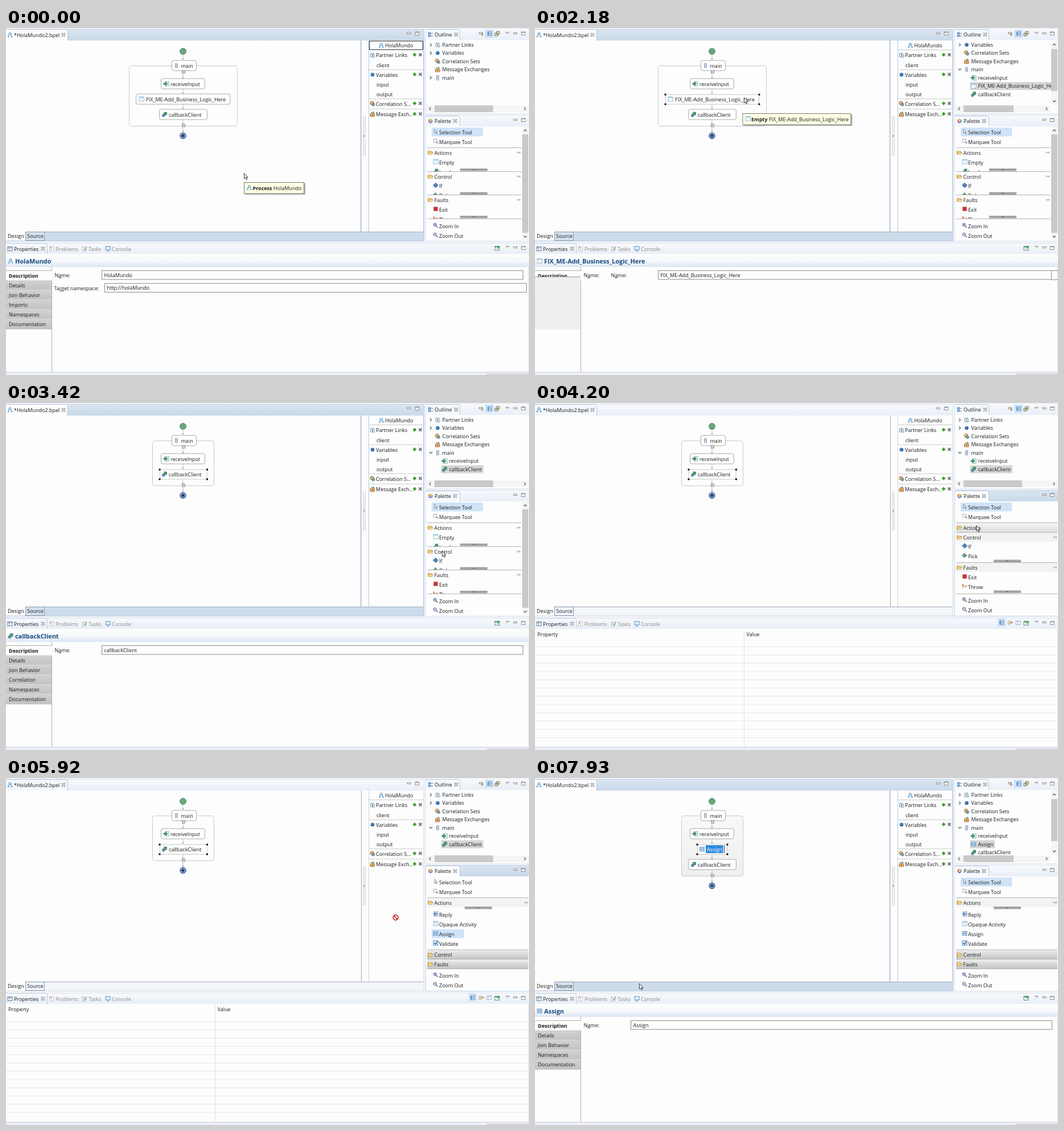
Animation, 919 px wide and 610 px high, one loop 8 s. Source, as an HTML page:

```html
<!DOCTYPE html>
<html lang="en">
<head>
<meta charset="utf-8">
<title>Process editor</title>
<style>
html, body { margin: 0; width: 100%; height: 100%; overflow: hidden; background: #fdfdfd; }
svg { display: block; }
text { white-space: pre; }
</style>
</head>
<body>
<svg id="stage" width="100%" height="100%" viewBox="0 0 919 610" font-family="'Open Sans', 'Noto Sans', sans-serif" font-size="9" fill="#1a1a1a">
<defs>
<linearGradient id="bar" x2="0" y2="1"><stop stop-color="#f7f9fc"/><stop offset="1" stop-color="#e9eef7"/></linearGradient>
<linearGradient id="hot" x2="0" y2="1"><stop stop-color="#d9e4f0"/><stop offset="1" stop-color="#c9d9ea"/></linearGradient>
<linearGradient id="head" x2="0" y2="1"><stop stop-color="#fdfdfd"/><stop offset=".55" stop-color="#f3f6fb"/><stop offset="1" stop-color="#dbe5f2"/></linearGradient>
<linearGradient id="tab" x2="0" y2="1"><stop stop-color="#d2d2d2"/><stop offset="1" stop-color="#c2c2c2"/></linearGradient>
<linearGradient id="drawer" x2="0" y2="1"><stop stop-color="#ededed"/><stop offset="1" stop-color="#c4c4c4"/></linearGradient>
<linearGradient id="hover" x2="0" y2="1"><stop stop-color="#f4f4f4"/><stop offset="1" stop-color="#dedede"/></linearGradient>
<linearGradient id="target" x2="0" y2="1"><stop stop-color="#f8f8f8"/><stop offset="1" stop-color="#efefef"/></linearGradient>
</defs>
<g id="view"></g>
<g id="cursor"></g>
</svg>
<script>
const LOOP = 8000, WHITE = '#fdfdfd';
const view = document.getElementById('view'), cursor = document.getElementById('cursor');

const R = (x, y, w, h, fill, more = '') => `<rect x="${x}" y="${y}" width="${w}" height="${h}" fill="${fill}" ${more}/>`;
const P = (d, stroke, fill = 'none', w = 1) => `<path d="${d}" stroke="${stroke}" fill="${fill}" stroke-width="${w}"/>`;
const T = (x, cy, s, more = '') => `<text x="${x}" y="${cy + 3.2}" ${more}>${s}</text>`;
const C = (x, y, r, fill, stroke = 'none') => `<circle cx="${x}" cy="${y}" r="${r}" fill="${fill}" stroke="${stroke}"/>`;
const clip = (x, y, w, h, body) => `<svg x="${x}" y="${y}" width="${w}" height="${h}" viewBox="${x} ${y} ${w} ${h}">${body}</svg>`;
const at = (x, y, body) => `<g transform="translate(${x} ${y})">${body}</g>`;

const sheet = R(-4, -4, 8.5, 8, '#eef7fc', 'stroke="#8fb3ce" stroke-width=".8"') + R(-4, -4, 8.5, 1.8, '#9fcae6');
const icons = {
  process: P('M0-4.5L2.5-2 0 .5-2.5-2ZM-1.5-.5L-4 3.5H-1.5M1.5-.5L4 3.5H1.5', '#3a86c4', '#cfe8f7'),
  links: P('M-3.5-3H-.5V3.5H-3.5ZM.5-1H3.5V4H.5Z', '#6f8ea8', '#e4eef4', .8) + C(1.5, -3, 1, '#7d9a68'),
  variable: C(0, 0, 3.3, '#2d6cae') + C(-1, -1, 1, '#8db9e4'),
  correlation: C(-1, -1, 3, '#e9c46a', '#a6543a') + C(1.5, 1.5, 2.4, '#7fb686', '#4567a0'),
  exchange: P('M-4-1H3.5V4H-4ZM-4 1.5H3.5M0-1V4', '#a8622c', '#f4d58a', .9) + P('M-3-3H2M1-4.5L3-3 1-1.5', '#4a7c4a'),
  sequence: P('M-2-4H2V-1.5H-2ZM-2-1.2H2V1.2H-2ZM-2 1.5H2V4H-2Z', '#7f9bb9', '#e3edf6', .8),
  receive: R(-2, -4, 6.5, 8, '#eef6fb', 'stroke="#6f93b3" stroke-width=".8"') + P('M-4.5-1.2H-.8V-3L2.6 0-.8 3V1.2H-4.5Z', '#2c7548', '#4fa36b', .7),
  reply: R(-3, -4, 7, 8, '#eef6fb', 'stroke="#6f93b3" stroke-width=".8"') + P('M3-1H-.5V-3L-4 0-.5 3V1H3Z', '#2a63a8', '#7fb2e4', .7),
  empty: sheet,
  opaque: sheet + P('M-3-2L3 3', '#b6c3cc'),
  invoke: P('M-4 1L0-3-1-4H4V1L3 0-1 4Z', '#2c6b58', '#4b9d74', .7) + P('M-4.5 2.5L-2 0 .5 2.5-2 4.5Z', '#335f9a', '#6c9ed0', .7),
  assign: P('M-4-3.5H4V-.8H-4ZM-4 .8H4V3.5H-4Z', '#4d84bd', '#d9e9f8', .9),
  validate: R(-4, -4, 8, 8, '#eaf3fb', 'stroke="#4b86bd"') + P('M-2.5 0L-.5 2 3-2.5', '#1f62a8', 'none', 1.6),
  folder: P('M-4 3V-3H-1L0-2H3V-.5M-4 3L-2.2-.5H4.8L3 3Z', '#b98a2f', '#fbe3a0', .8),
  'if': P('M0-4.3L4.5 0 0 4.3-4.5 0Z', '#2c5f93', '#4f86ba', .7),
  pick: P('M-4.5 0L0-4 1-1.5 4.5 0 1 1.5 0 4Z', '#25663f', '#55a675', .7),
  exit: R(-3.2, -3.2, 6.4, 6.4, '#d6293c', 'stroke="#a83a48" stroke-width=".7"'),
  'throw': P('M-3-3.5V1M-3 2.5V3.5', '#c33', 'none', 1.6) + P('M-1 0H3M1.5-2L4 0 1.5 2', '#b08a20'),
  arrow: P('M-2-4V3L-.3 1.5 1 4 2 3.5 .8 1H3Z', '#666', '#fff', .8),
  marquee: P('M-3.5-3.5H2V2H-3.5Z', '#4a6583', 'none', .9).replace('/>', ' stroke-dasharray="1.5 1.2"/>') + P('M1 1L4.5 4', '#333'),
  zoomin: C(-1.2, -1.2, 2.8, '#eef4fb', '#5f7196') + P('M1 1L3.8 3.8M-2.6-1.2H.2M-1.2-2.6V.2', '#3c4c78', 'none', 1.1),
  zoomout: C(-1.2, -1.2, 2.8, '#eef4fb', '#5f7196') + P('M1 1L3.8 3.8M-2.6-1.2H.2', '#3c4c78', 'none', 1.1),
  close: P('M-3-3L3 3M3-3L-3 3', '#8c8c8c', 'none', 2.4) + P('M-2.6-2.6L2.6 2.6M2.6-2.6L-2.6 2.6', '#fff', 'none', .9),
  plus: P('M0-3V3M-3 0H3', '#3f9a2f', 'none', 2.4),
  remove: P('M-2.5-2.5L2.5 2.5M2.5-2.5L-2.5 2.5', '#777', 'none', 1.9),
  min: R(-3, -1.5, 6, 2.4, '#fff', 'stroke="#777" stroke-width=".8"'),
  max: R(-3.3, -3, 6.6, 5.5, '#fff', 'stroke="#777" stroke-width=".8"') + P('M-3.3-2.4H3.3', '#777'),
  menu: P('M-3-1.5H3L0 1.5Z', '#777', '#fff', .8),
  tree: P('M-3-3H0M-3-3V3H0M-3 0H0M1-3H4M1 0H4M1 3H4', '#35699f', 'none', 1.2),
  outline: P('M-3.5-3.5H0V-1H-3.5ZM-3.5 1H0V3.5H-3.5ZM1.5-2H4M1.5 2.5H4', '#3c74b4', '#cfe2f4', 1.1),
  palette: ['#e8b63a', '#8abf4c', '#4f9fd6', '#6d6cc0', '#c95fa6', '#e2703a'].map((c, i) =>
    C(2.6 * Math.sin(i * Math.PI / 3), -2.6 * Math.cos(i * Math.PI / 3), 1.5, c)).join(''),
  sync: P('M-3.5-2.5H2.5V.5H-3.5Z', '#8f8d80', '#e9e7da', .9) + P('M1-1L4 1.5 1 4Z', '#77756a', '#c9c6b2', .7),
  stack: P('M-4-1H1V4H-4ZM-1-4H4V1H-1Z', '#7a7353', '#ddd8bf'),
  table: R(-4, -3.5, 8, 7, '#fff', 'stroke="#5f7fa3"') + P('M-4-1.5H4M-1-3.5V3.5', '#5f7fa3', 'none', .8),
  problems: R(-3.5, -4, 7, 8, '#fff', 'stroke="#b3bdc7" stroke-width=".8"') + C(-1, -1.5, 1.4, '#d88') + C(0, 2, 1.1, '#e6c873'),
  tasks: R(-3.5, -3, 6, 7, '#f2f5e6', 'stroke="#a3aeb0" stroke-width=".8"') + P('M-1 0L1 2 4-3', '#6ba286', 'none', 1.2),
  console: R(-4, -4, 8, 6, '#e4f0fa', 'stroke="#6190bd"') + P('M-2 4H2', '#6190bd', 'none', 1.2),
  pinned: R(-4.5, -3, 8, 6.5, '#fff', 'stroke="#5c8b72"') + P('M-4.5-2.5H3.5M0 1L4-3.5', '#3d9a5f', 'none', 1.8),
  filter: P('M-4-2.5H1M-4 2.5H1M-4 0H4M2-2L4.5 0 2 2', '#b28b3f', 'none', 1.2),
  pin: P('M-1-1.7L-3 0-1 1.7M1-1.7L3 0 1 1.7M-2 0H2', '#999', 'none', .9)
};
const I = (name, x, y) => at(x, y, icons[name]);
const chevron = (x, y, turn, color = '#555') => `<path transform="translate(${x} ${y}) rotate(${turn})" d="M-1.5-2.6L1.2 0-1.5 2.6" fill="none" stroke="${color}" stroke-width="1.1"/>`;

const nodes = {
  receiveInput: ['receive', 272, 78], 'FIX_ME-Add_Business_Logic_Here': ['empty', 228, 166.5],
  callbackClient: ['invoke', 269, 85], Assign: ['assign', 284, 54.5]
};
const [RECV, FIX, CALL, ASSIGN] = Object.keys(nodes);

function diagram({ flow, sel }) {
  const wide = flow.includes(FIX), editing = flow.includes(ASSIGN);
  const bottom = 98 + 27 * (flow.length - 1) + 20.5;
  const arrow = (y, len) => P(`M311 ${y}V${y + len}`, '#c4c4c4') + P(`M309.3 ${y + len - 3}H312.7L311 ${y + len}Z`, 'none', '#aaa');
  const fold = y => R(309.5, y - 2.5, 5, 5, '#fff', 'stroke="#777" stroke-width=".8"') + P(`M310.5 ${y}H313.5`, '#333', 'none', .8);
  const box = (x, y, w) => R(x + .5, y - 9, w - 1, 18, '#fff', 'rx="3" stroke="#a9a9a9"');
  let s = C(311, 41, 5.5, '#6aa57c', '#559a6b');
  s += R(wide ? 216.5 : 257.5, 66.5, wide ? 190 : 108, bottom - 66.5, editing ? 'url(#target)' : 'none', 'rx="4" stroke="#c9c9c9"');
  s += arrow(47, 9) + box(291, 66, 44) + I('sequence', 299.5, 66) + T(307.5, 67, 'main') + fold(77);
  flow.forEach((name, i) => {
    const [icon, x, w] = nodes[name], y = 98 + 27 * i, on = name === sel;
    s += arrow(y - 18, 9);
    s += on ? R(x + 1.5, y - 8, w - 2.5, 17, '#fff', 'stroke="#c6c6c6"') : box(x, y, w);
    s += I(icon, x + (name === FIX ? 10 : 9.5), y);
    if (on && name === ASSIGN)
      s += R(299, y - 8, 34, 16, '#fff') + R(300, y - 7, 30.5, 14, '#2f8ae0') + P(`M332.5 ${y - 7}V${y + 7}`, '#333') + T(302, y + .5, name, 'fill="#fff"');
    else s += T(x + (name === FIX ? 18 : 17), y + .5, name);
    if (on) for (const dx of [-.5, w - 2]) for (const dy of [-9.5, 7.5]) s += R(x + dx, y + dy, 3, 3, '#111');
  });
  s += arrow(bottom - 11, 9) + fold(bottom - 1) + arrow(bottom + 2, 9);
  return s + C(311, bottom + 17, 5.2, '#6f97c9', '#2c4a78') + C(311, bottom + 17, 2.2, '#17305a');
}

function editor(s) {
  const fill = s.focus ? 'url(#bar)' : 'url(#hot)', edge = s.focus ? '#e4e9f1' : '#c3d4e6';
  let o = R(0, 2, 735, 373, edge) + R(0, 3, 734, 19, fill) + R(0, 22, 733, 336, WHITE);
  o += R(0, 2, 108, 20, s.focus ? '#f4f7fb' : WHITE) + P('M0 2.5H105Q108.5 3 108.5 6V22', '#b4c3d6');
  o += I('process', 7, 12) + T(14, 12.5, '*HolaMundo2.bpel') + I('close', 101, 12) + I('min', 708, 9.5) + I('max', 722.5, 10);
  o += R(0, 359, 733, 14, s.focus ? '#f3f6fb' : '#cddceb') + P('M0 358.5H733', '#a2adba');
  o += R(0, 358, 34, 15.5, WHITE) + R(34.5, 358.5, 33, 15, s.focus ? '#f3f6fb' : '#d6e2ee', 'stroke="#8798aa"');
  o += T(3, 366, 'Design') + T(37, 366, 'Source');
  o += s.focus ? P('M624.5 22V358', '#a8a8a8') : R(622.5, 22, 2.5, 336, '#bfd1e4');
  o += P('M637.5 22V358', s.focus ? '#d5d5d5' : '#b7cadd') + R(626.5, 155, 6, 70, '#f5f5f5');
  for (const y of [156, 195]) o += `<path d="M628.5 ${y}v29m3-29v29" stroke="#aaa" stroke-dasharray="1 1.5"/>`;
  o += chevron(629.5, 189.5, 0, '#888');
  o += s.sel ? P('M638 38.5H733', '#c9c9c9') : R(638.5, 23, 94, 15, '#fff', 'stroke="#222"');
  o += I('process', 659.5, 30.5) + T(666, 31, 'HolaMundo');
  [['links', 'Partner Links', 47.5], ['variable', 'Variables', 82], ['correlation', 'Correlation S...', 133], ['exchange', 'Message Exch...', 151.5]].forEach(([icon, name, y]) => {
    o += I(icon, 644, y) + T(650, y + .5, name) + I('plus', 718, y - .5) + I('remove', 728, y - .5);
  });
  o += T(651, 65.5, 'client') + T(651, 100, 'input') + T(651, 116.5, 'output') + P('M638 73.5H733M638 124.5H733M638 142.5H733', '#cfcfcf');
  return o + diagram(s);
}

const viewTab = (y, icon, name, hot) => R(738, y, 181, 19, hot ? 'url(#hot)' : 'url(#bar)') + R(738, y, 59, 19, hot ? WHITE : '#f5f8fc') +
  P(`M738 ${y + .5}H794Q797.5 ${y + 1} 797.5 ${y + 4}V${y + 19}`, '#bccadb') + I(icon, 746, y + 9.5) + T(753, y + 10, name) +
  I('close', name === 'Outline' ? 791 : 789, y + 9.5) + I('min', 895, y + 7.5) + I('max', 909, y + 8);

function outline({ flow, sel }) {
  const tall = sel && flow.length > 2, skip = sel === FIX;
  let rows = [['links', 'Partner Links', 0], ['variable', 'Variables', 0], ['correlation', 'Correlation Sets'], ['exchange', 'Message Exchanges'], ['sequence', 'main', sel ? 90 : 0]];
  if (sel) rows = rows.concat(flow.map(name => [nodes[name][0], name, -1]));
  if (skip) rows.shift();
  let list = '';
  rows.forEach(([icon, name, mark], i) => {
    const y = 29.5 + 14.5 * i, dx = mark === -1 ? 12 : 0;
    if (mark >= 0) list += chevron(746.5, y, mark);
    if (name === sel) list += R(764.5, y - 7, { [CALL]: 74.5, [ASSIGN]: 43.5, [FIX]: 160 }[name], 14, '#d6d6d6');
    list += I(icon, 758.5 + dx, y) + T(766.5 + dx, y, name);
  });
  let o = R(737, 2, 182, 149, '#dfe6f0') + viewTab(2, 'outline', 'Outline') + R(738, 21, 181, 129, WHITE);
  o += R(842, 3, 15, 14, '#cbe1f6') + I('sync', 835, 10) + I('tree', 850, 10) + I('stack', 863, 10) + I('menu', 881, 9);
  o += clip(738, 21, tall ? 169 : 181, 115, list);
  const end = tall ? 899 : 912;
  o += R(739, 136, end - 732, 12, '#f5f5f5') + R(753, 136, tall ? 88 : 103, 12, '#c9c9c9') + chevron(745, 142, 180) + chevron(end, 142, 0);
  if (tall) o += R(907, 22, 11, 113, '#f5f5f5') + R(907, 37, 11, 74, '#c9c9c9') + chevron(912.5, 29, -90) + chevron(912.5, 129, 90);
  return o;
}

function palette(s) {
  const wide = s.pal > 0, right = wide ? 918 : 906, pinX = wide ? 914 : 901, nubX = wide ? 806 : 798;
  const row = (name, y, icon) => I(icon || name.split(' ')[0].toLowerCase(), 755, y - 1) + T(761, y + .5, name);
  const mark = (y, w, color) => R(748, y - 8, w, 15.5, color);
  const nub = y => R(nubX, y, 48, 4.5, '#a3a3a3') + P(`M${nubX + 22} ${y + 2}h4`, '#555');
  const head = (name, y, fill, pin) => R(740, y - 8, right - 740, 16, fill) + P(`M740 ${y - 8.5}H${right}`, '#b5b5b5') +
    I('folder', 745.5, y) + T(752.5, y + .3, name) + (pin ? I('pin', pinX, y) : '');
  const items = (names, y, top, bottom) => clip(739, top, right - 739, bottom - top, names.map((n, i) => row(n, y + 17 * i)).join(''));
  const acts = ['Empty', 'Invoke', 'Receive', 'Reply', 'Opaque Activity', 'Assign', 'Validate'];
  let o = R(737, 153, 182, 222, s.focus ? '#c6d6e7' : '#dfe6f0') + viewTab(154, 'palette', 'Palette', s.focus) + R(738, 173, 181, 201, WHITE);
  if (s.tool === 'select') o += mark(183, 90, '#cfe3f9');
  o += row('Selection Tool', 183, 'arrow') + row('Marquee Tool', 200);
  if (s.pal === 0) {
    o += head('Actions', 219, WHITE, 1) + items(acts, 236, 227, 252) + nub(247);
    o += head('Control', 261, WHITE, 1) + items(['If', 'Pick'], 277.5, 269, 294) + nub(288.5);
    o += head('Faults', 302, WHITE, 1) + items(['Exit', 'Throw'], 319, 310, 335) + nub(330);
    o += R(907, 174, 11, 199, '#f5f5f5') + R(907, 187, 11, 173, '#c9c9c9') + chevron(912.5, 180, -90) + chevron(912.5, 367, 90);
  } else if (s.pal === 1) {
    o += head('Actions', 219, 'url(#hover)') + head('Control', 236, '#f3f3f3', 1) + items(['If', 'Pick'], 252, 244, 281) + nub(275.5);
    o += head('Faults', 289, '#f3f3f3', 1) + items(['Exit', 'Throw'], 306, 297, 335) + nub(329.5);
  } else {
    const w = { Reply: 54, Validate: 54, Assign: 57 }[s.hot];
    const y0 = s.pal === 2 ? 236 : 189;
    if (w) o += mark(y0 + 17 * acts.indexOf(s.hot), w, s.tool === 'assign' ? '#cfe3f9' : '#fbe4b0');
    o += head('Actions', 219, '#f3f3f3', 1) + items(acts, y0, 227, 302) + nub(s.pal === 2 ? 297 : 226);
    o += head('Control', 310.5, 'url(#drawer)') + head('Faults', 327, 'url(#drawer)');
  }
  const z = wide ? 347 : 348;
  return o + P(`M740 335.5H${right}`, '#b5b5b5') + row('Zoom In', z, 'zoomin') + row('Zoom Out', z + 17, 'zoomout');
}

const tabNames = (...extra) => ['Description', 'Details', 'Join Behavior', ...extra, 'Namespaces', 'Documentation'];
const panels = {
  process: ['process', 'HolaMundo', tabNames('Imports')],
  fix: ['empty', FIX, tabNames()],
  swap: ['empty', FIX, null],
  call: ['invoke', CALL, tabNames('Correlation')],
  assign: ['assign', ASSIGN, tabNames()]
};

function properties({ props }) {
  const table = props === 'table';
  let o = R(0, 378, 919, 227, '#e1e7f0') + R(0, 379, 919, 18, 'url(#bar)') + R(0, 397, 917.5, 207, WHITE);
  o += P('M0 378.5H69Q72.5 379 72.5 382V397', '#bccadb') + I('table', 7, 388) + T(14, 388.5, 'Properties') + I('close', 65, 388);
  [['problems', 'Problems', 80], ['tasks', 'Tasks', 138], ['console', 'Console', 179]].forEach(([icon, name, x]) => {
    o += I(icon, x, 388) + T(x + 7, 388.5, name, 'fill="#888"');
  });
  o += I('pinned', 863.5, 387) + I('menu', 881.5, 385) + I('min', 895, 386) + I('max', 909, 387);
  if (table) {
    o += R(813, 379, 14, 14, '#cbe1f6') + I('tree', 820, 386) + I('filter', 834.5, 386) + `<g opacity=".5">${I('table', 849, 386)}</g>`;
    o += T(4, 407, 'Property') + T(371.5, 407, 'Value') + P('M367.5 399V604', '#dedede');
    for (let i = 0; i < 12; i++) o += P(`M0 ${428.5 + 14.5 * i}H917`, '#e6e6e6');
    return o;
  }
  const [icon, title, tabs] = panels[props];
  const field = (x, y, w, value) => R(x + .5, y - 8, w, 15.5, WHITE, 'stroke="#8a8a8a"') + T(x + 4.5, y, value);
  const under = (a, b, c) => `${a}<tspan text-decoration="underline">${b}</tspan>${c}`;
  const name = under('N', 'a', 'me:');
  o += R(0, 400, 919, 20, 'url(#head)') + I(icon, 8, 409.5) + T(16, 410.5, title, 'font-size="10.9" font-weight="700" fill="#174a7c"');
  o += P('M80.5 420V604', '#b0b0b0') + R(0, 427, 81, 17, WHITE) + P('M0 426.5H80.5', '#b0b0b0');
  o += T(5, 435.5, 'Description', 'font-weight="700"') + T(85.5, 434.5, name);
  if (!tabs) {
    o += R(0, 438, 80, 92, '#efefef') + P('M0 437.5H80', '#999') + T(133.5, 434.5, name);
    return o + field(216, 434.5, 691, title) + P('M908 426.5H919M908 442.5H919', '#8a8a8a');
  }
  tabs.slice(1).forEach((s, i) => {
    o += R(0, 443.5 + 17 * i, 80, 17, 'url(#tab)') + T(5, 452.5 + 17 * i, s);
  });
  o += P(`M0 ${444 + 17 * (tabs.length - 1)}H80`, '#a5a5a5') + field(168, 434.5, 740, title);
  if (props === 'process') o += T(84.5, 457.5, under('Ta', 'r', 'get namespace:')) + field(173, 457, 741, 'http://holaMundo');
  return o;
}

const tip = (x, y, w, icon, bold, rest) => R(x + 2, y + 2, w, 20, '#b4b4b4') + R(x + .5, y + .5, w - 1, 19.5, '#ffffe3', 'stroke="#7c7c7c"') +
  I(icon, x + 9.5, y + 9.5) + T(x + 15.5, y + 10.5, `<tspan font-weight="700">${bold}</tspan> ${rest}`);

const changes = [
  [0, { flow: [RECV, FIX, CALL], sel: '', props: 'process', focus: 0, pal: 0, tool: 'select', hot: '', tip: 1 }],
  [790, { tip: 0 }],
  [1410, { sel: FIX, props: 'swap' }],
  [1490, { tip: 2 }],
  [1560, { props: 'fix' }],
  [2180, { props: 'swap' }],
  [2290, { flow: [RECV, CALL], sel: CALL, props: 'call', tip: 0 }],
  [3660, { focus: 1, props: 'table' }],
  [3900, { pal: 1 }],
  [4680, { pal: 2 }],
  [4950, { hot: 'Reply' }],
  [5150, { pal: 3, hot: 'Validate' }],
  [5690, { hot: 'Assign' }],
  [5850, { tool: 'assign' }],
  [7010, { flow: [RECV, ASSIGN, CALL], sel: ASSIGN, tool: 'select', hot: '' }],
  [7090, { focus: 0, props: 'assign' }]
];
const moves = [
  [710, 418, 255], [1250, 373, 152], [1490, 367, 122], [2580, 367, 122], [3180, 785, 301], [3420, 766, 260],
  [3800, 772, 222], [4200, 775, 215], [4349, 775, 215], [4350, 766, 207], [4520, 766, 207], [4700, 771, 219], [4990, 791, 291.5],
  [5300, 802, 299], [5530, 791, 288], [5690, 789, 285], [5850, 785, 276], [6220, 262, 116], [6460, 354, 128],
  [6530, 335, 118], [6610, 316, 113], [7540, 315, 113], [7930, 183, 361]
];
const arrowCursor = P('M.5.5V10L2.7 8 4.3 11.6 5.8 11 4.2 7.5H7Z', '#222', '#fff', .9);
const denied = C(0, 0, 4.6, '#fff') + `<circle r="4.4" fill="none" stroke="#d3242f" stroke-width="1.7"/>` + P('M-3-3L3 3', '#d3242f', 'none', 1.7);

function position(t) {
  const i = moves.findIndex(m => m[0] > t);
  if (i === 0) return moves[0].slice(1);
  if (i < 0) return moves[moves.length - 1].slice(1);
  const [t0, x0, y0] = moves[i - 1], [t1, x1, y1] = moves[i], k = (t - t0) / (t1 - t0);
  return [x0 + (x1 - x0) * k, y0 + (y1 - y0) * k];
}

let shown = -1;
function draw(t) {
  const active = changes.filter(c => c[0] <= t), [x, y] = position(t);
  const s = Object.assign({}, ...active.map(c => c[1]));
  if (active.length !== shown) {
    shown = active.length;
    view.innerHTML = R(0, 0, 919, 610, '#f0f3f9') + editor(s) + outline(s) + palette(s) + properties(s) +
      R(0, 605, 919, 5, '#eef1f7') + P('M0 605.5H919', '#d3dbe7') + P('M845 608.5H919', '#b5b5b5') +
      (s.tip === 1 ? tip(418, 271, 106, 'process', 'Process', 'HolaMundo') : s.tip === 2 ? tip(364.5, 150, 191, 'empty', 'Empty', FIX) : '');
  }
  cursor.innerHTML = s.tool === 'assign' && x < 735 ? denied : arrowCursor;
  cursor.setAttribute('transform', `translate(${x} ${y})`);
}

function tick() {
  draw(performance.now() % LOOP);
  requestAnimationFrame(tick);
}
tick();
</script>
</body>
</html>
```
